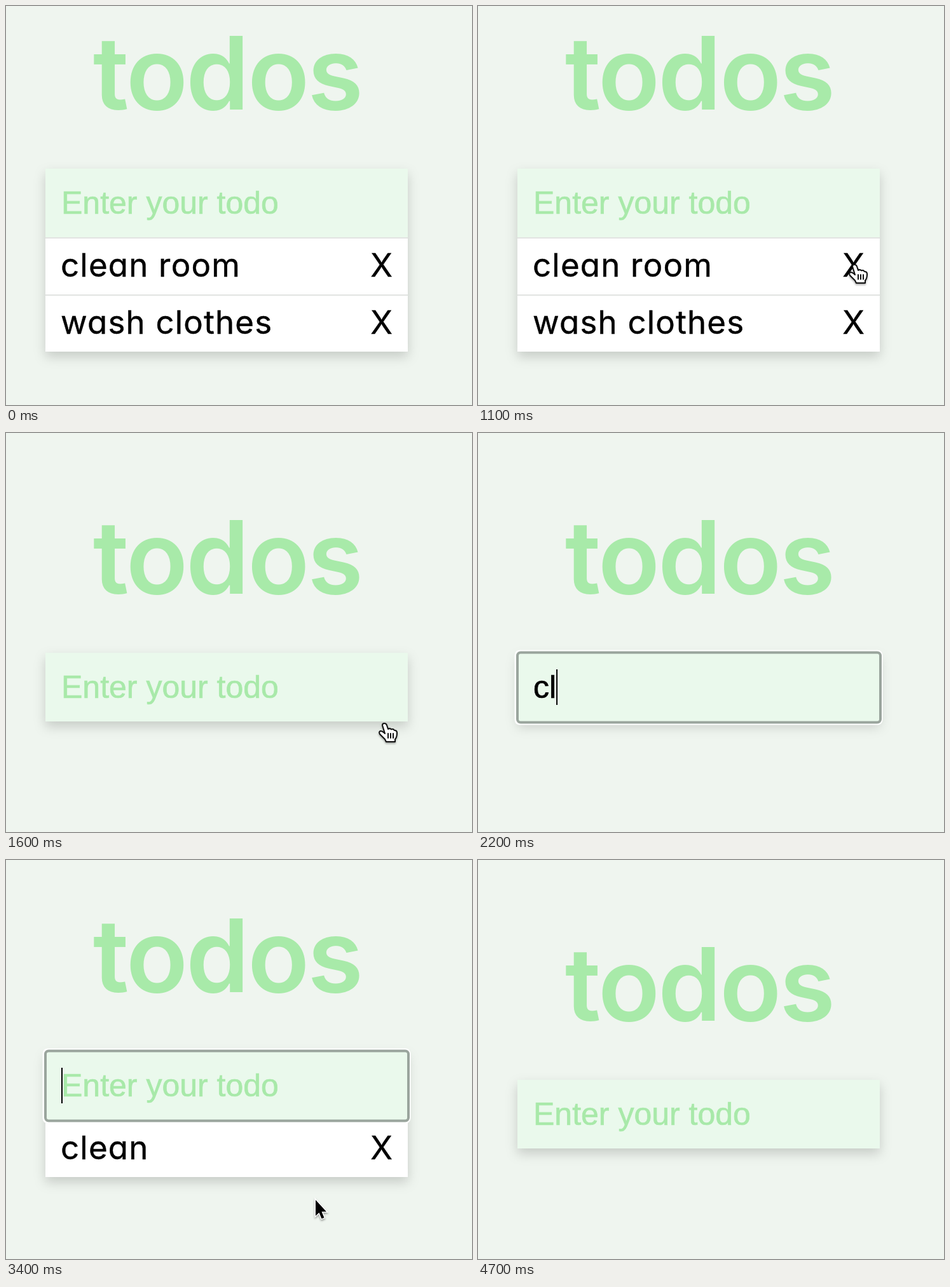
An HTML page for the animation above (4800 ms loop, 733 by 628 pixels).

```html
<!DOCTYPE html>
<html lang="en">
<head>
<meta charset="utf-8">
<title>todos</title>
<style>
  html, body { margin: 0; width: 100%; height: 100%; overflow: hidden; background: #eff5ef; }
  svg { display: block; }
  #title { font: 600 160px Inter, sans-serif; letter-spacing: -3px; fill: #a8eaa9; }
  #card { fill: #fff; filter: drop-shadow(0 8px 9px rgba(0, 0, 0, .17)); }
  #input { font: 50px "Liberation Sans", Arial, sans-serif; stroke-width: .7; }
  .row text { font: 51px Inter, sans-serif; font-feature-settings: "cv11"; stroke: #000; stroke-width: .4; }
  .row .label { letter-spacing: 1.2px; }
  .row path { stroke: #e2e4e2; stroke-width: 2; }
  .pointer { filter: drop-shadow(0 2px 1.5px rgba(0, 0, 0, .35)); }
</style>
</head>
<body>
<svg width="733" height="628" viewBox="0 0 733 628">
  <g id="app">
    <text id="title" x="348" y="-93" text-anchor="middle">todos</text>
    <rect id="card" x="62" width="570"/>
    <rect x="62" width="570" height="108" fill="#eaf9ec"/>
    <g id="list"></g>
    <g id="ring">
      <rect x="57.5" y="-4.5" width="579" height="118" rx="8" fill="#fff"/>
      <rect x="62" y="-.5" width="571" height="110" rx="5" fill="#eaf9ec" stroke="#9aa59d" stroke-width="4"/>
    </g>
    <text id="input" x="87" y="71"></text>
    <rect id="caret" y="26" width="2" height="56"/>
  </g>
  <g id="arrow" class="pointer">
    <path d="M0 0V25L5.5 20L9.5 29.5L13.5 28L9.5 18.5H17Z" stroke="#fff" stroke-width="3" paint-order="stroke"/>
  </g>
  <g id="hand" class="pointer" stroke="#111" stroke-width="2" stroke-linejoin="round" stroke-linecap="round">
    <path d="M-3 4Q-3 1 0 1Q3 1 4 4L6 10Q9 8 11 10.5Q14 9 16 12Q20 12 20 16Q20 23 17 26V30H3L1 26L-7 18Q-9 14 -6 13Q-3 13 1 17Z" fill="#fff"/>
    <path d="M6 17V24M10 17V24M14 17V24"/>
  </g>
  <g id="beam" class="pointer">
    <path d="M-5 -16H5V-14H1V14H5V16H-5V14H-1V-14H-5Z" stroke="#fff" stroke-width="2" paint-order="stroke"/>
  </g>
</svg>
<script>
const LOOP = 4800, STEP = 100, ROW = 90, HEAD = 108;
const $ = id => document.getElementById(id);

// Pointer trips: each eases along a curve, then rests until `end`.
const enter = [465, 640], firstX = [592, 406], secondX = [595, 456], field = [525, 405];
const below = [491, 538], lastX = [588, 460], exit = [545, 640];
const trips = [
  { start: 0, time: 1000, end: 1200, shape: 'hand', path: [enter, [650, 465], firstX] },
  { start: 1200, time: 200, end: 1800, shape: 'hand', path: [firstX, firstX, secondX] },
  { start: 1800, time: 200, end: 2000, shape: 'beam', path: [secondX, secondX, field] },
  { start: 3000, time: 500, end: 3600, shape: 'arrow', path: [[430, 440], [440, 500], below] },
  { start: 3600, time: 400, end: 4100, shape: 'hand', path: [below, below, lastX] },
  { start: 4100, time: 700, end: 4600, shape: 'arrow', path: [lastX, [670, 500], exit] }
];

const show = (node, on) => node.setAttribute('visibility', on ? 'visible' : 'hidden');
const shift = (node, x, y) => node.setAttribute('transform', `translate(${x} ${y})`);
const easeOut = p => 1 - (1 - p) ** 2;

function todosAt(t) {
  if (t < 1200) return ['clean room', 'wash clothes'];
  if (t < 1500) return ['wash clothes'];
  return t >= 3000 && t < 4100 ? ['clean'] : [];
}

function typedAt(t) {
  return t < 3000 ? 'clean'.slice(0, Math.max(0, Math.floor((t - 2000) / 80))) : '';
}

function rowMarkup(label, i) {
  return `<g class="row" transform="translate(0 ${HEAD + ROW * i})">
    <path d="M62 1H632"/>
    <text class="label" x="86" y="62">${label}</text>
    <text x="608" y="62" text-anchor="end">X</text>
  </g>`;
}

function drawPointer(t) {
  document.querySelectorAll('.pointer').forEach(node => show(node, false));
  const trip = trips.find(({ start, end }) => t > start && t <= end);
  if (!trip) return;
  const k = easeOut(Math.min(1, (t - trip.start) / trip.time));
  const [a, b, c] = trip.path;
  const along = i => (1 - k) ** 2 * a[i] + 2 * k * (1 - k) * b[i] + k * k * c[i];
  const pointer = $(k < .75 ? 'arrow' : trip.shape);
  shift(pointer, along(0), along(1));
  show(pointer, true);
}

function draw(t) {
  const todos = todosAt(t), typed = typedAt(t);
  shift($('app'), 0, 346 - ROW / 2 * todos.length);
  $('card').setAttribute('height', HEAD + ROW * todos.length);
  $('list').innerHTML = todos.map(rowMarkup).join('');

  const input = $('input'), ink = typed ? '#000' : '#a8e9a9';
  input.textContent = typed || 'Enter your todo';
  input.setAttribute('fill', ink);
  input.setAttribute('stroke', ink);
  show($('ring'), t >= 2000 && t < 4000);
  show($('caret'), t >= 2000 && t < 2900 || t >= 3000 && t < 3500);
  $('caret').setAttribute('x', 87 + (typed ? input.getComputedTextLength() : 0));
  drawPointer(t);
}

function frame() {
  draw(Math.floor(performance.now() % LOOP / STEP) * STEP);
  requestAnimationFrame(frame);
}
frame();
</script>
</body>
</html>
```
